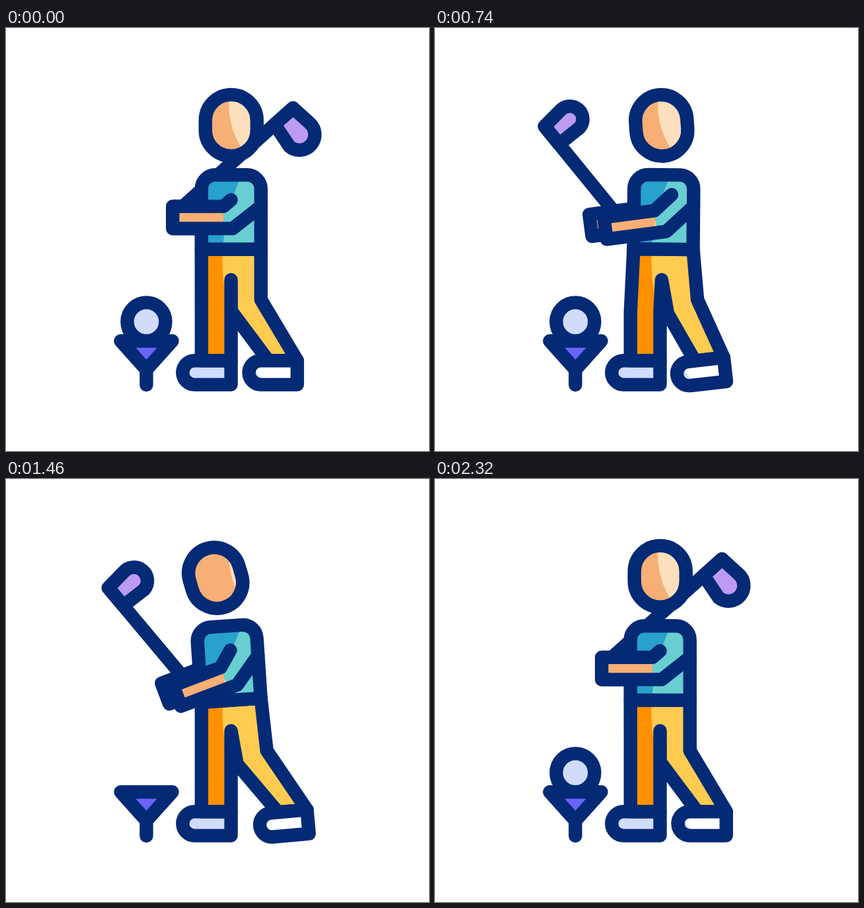
Recreate the animation shown at these times as an HTML page. Size 640x640 px, loop 2400 ms.

```html
<!DOCTYPE html>
<html lang="en">
<head>
<meta charset="utf-8">
<title>Golf swing</title>
<style>
  html, body { margin: 0; width: 100%; height: 100%; overflow: hidden; background: #fff; }
  svg { display: block; width: 100%; height: 100%; }
  .line { fill: none; stroke: #042a75; stroke-width: 20.4; stroke-linecap: round; stroke-linejoin: round; }
</style>
</head>
<body>
<svg id="stage" viewBox="0 0 640 640">
  <defs>
    <clipPath id="lit"><circle cx="627.5" cy="352" r="300"/></clipPath>
    <clipPath id="litFace"><circle cx="461" cy="115" r="124"/></clipPath>
  </defs>
</svg>
<script>
const NS = 'http://www.w3.org/2000/svg';
const stage = document.getElementById('stage');
const LOOP = 2400, STEP = 20;
const SKIN = '#f7af75', SKIN_LIT = '#fcdfbd';
const TEAL = '#28a1cc', TEAL_LIT = '#68ced1';
const SHOE = '#d1dcfb';

function add(parent, tag, attrs) {
  const el = document.createElementNS(NS, tag);
  for (const k in attrs) el.setAttribute(k, attrs[k]);
  return parent.appendChild(el);
}

// A shape with a shaded fill, a lit fill clipped to fixed light, and an outline.
function part({ dark, light, clip = 'lit', line = true }) {
  const paths = [];
  if (dark) paths.push(add(stage, 'path', { fill: dark }));
  if (light) {
    const g = add(stage, 'g', { 'clip-path': `url(#${clip})` });
    paths.push(add(g, 'path', { fill: light }));
  }
  if (line) paths.push(add(stage, 'path', { class: 'line' }));
  return (d, move) => {
    for (const p of paths) {
      p.setAttribute('d', d);
      if (move) p.setAttribute('transform', move);
    }
  };
}

const poly = (pts, close = true) => 'M' + pts.map(p => p.join(' ')).join('L') + (close ? 'Z' : '');
const place = ([x, y], a = 0) => `translate(${x} ${y}) rotate(${a})`;
// Point at local offset (x, y) from p in a frame turned by deg
function from(p, x, y, deg = 0) {
  const r = deg * Math.PI / 180, c = Math.cos(r), s = Math.sin(r);
  return [p[0] + x * c - y * s, p[1] + x * s + y * c];
}

// Parts from back to front
const farArm = part({ dark: SKIN });
const club = part({ dark: '#bd9bf2' });
const shaft = part({});
const frontShoe = part({ dark: SHOE, light: '#fff' });
const pants = part({ dark: '#ff9100', light: '#fdcb50' });
const backShoe = part({ dark: SHOE, light: '#fff' });
const torso = part({ dark: TEAL, light: TEAL_LIT });
const head = part({ dark: SKIN, light: SKIN_LIT, clip: 'litFace' });
const forearm = part({ dark: SKIN, light: SKIN_LIT, line: false });
const sleeve = part({ dark: TEAL_LIT, line: false });
const nearArm = part({});
const tee = part({ dark: '#6a64fa' });
const ball = part({ dark: SHOE });

const HEAD = 'M-39-7.4a39 39 0 0 1 78 0V7.4a39 39 0 0 1-78 0Z';
const TORSO = 'M-45 0V-91.5a21 21 0 0 1 21-21H24a21 21 0 0 1 21 21V0Z';
const SOLE = 'M0 0H-55a18.2 18.2 0 0 0 0 36.4H0Z';
const BALL = 'M-29 0a29 29 0 0 1 58 0a29 29 0 0 1-58 0Z';

frontShoe(SOLE, place([340.5, 503.2]));
tee('M173.4 473.5H251.5L212.4 517ZM212.4 517V540');

// Three key poses; angles in degrees
const REST = {
  hip: 340.7, lean: 0, nod: 0, knee: 385.7, heel: 440.7, tilt: 0,
  armX: 340.5, armY: 260, upper: 139, reach: 15, fore: 0, apart: 0,
  gripX: 262, gripY: 275, swing: -41.8, length: 231
};
const BACK = {
  hip: 352.2, lean: 12.8, nod: 39, knee: 386, heel: 387, tilt: 0,
  armX: 386, armY: 244, upper: 195, reach: 19.5, fore: 45, apart: 0,
  gripX: 321.5, gripY: 197.6, swing: 16, length: 226.5
};
const HIT = {
  hip: 340.7, lean: -8.3, nod: -35, knee: 405, heel: 472.5, tilt: -11,
  armX: 338, armY: 258, upper: 96, reach: 47.3, fore: -45, apart: -38,
  gripX: 275, gripY: 361, swing: -233, length: 129
};

// Moves between poses; bow bends the path of the grip
const MOVES = [
  { a: REST, b: BACK, start: 0, end: 400, bow: [0, 0] },
  { a: BACK, b: HIT, start: 400, end: 1030, bow: [-22, -13] },
  { a: HIT, b: REST, start: 1030, end: 1860, bow: [5, -9] }
];

const portion = (t, start, end) => Math.min(1, Math.max(0, (t - start) / (end - start)));
const half = u => (2 * u) ** 2.2 / 2;
const ease = u => u < 0.5 ? half(u) : 1 - half(1 - u);

function poseAt(t) {
  const { a, b, start, end, bow } = MOVES.findLast(m => t >= m.start);
  const p = ease(portion(t, start, end));
  const pose = {};
  for (const k in a) pose[k] = a[k] + (b[k] - a[k]) * p;
  const bend = 4 * p * (1 - p);
  pose.gripX += bow[0] * bend;
  pose.gripY += bow[1] * bend;
  return pose;
}

function ballAt(t) {
  if (t < 1500) {
    const d = Math.max(0, t - 975) / 85;
    return [212.4 + 203 * d, 444.4 - 43.4 * d];
  }
  const u = portion(t, 1550, 2030);
  return [212.4, -70 + 514.4 * u * u * (3 - 2 * u)];
}

function drawBody(q) {
  const hip = [q.hip, 334.7];
  const neck = from(hip, 0, -135, q.lean);
  head(HEAD, place(from(neck, 0, -52.4, q.nod), q.nod));
  torso(TORSO, place(hip, q.lean));

  const heel = [q.heel, 503.2 - 0.11 * q.tilt ** 2];
  pants(poly([
    from(hip, -45, 0, q.lean), [295.8, 430], [295.8, 503.2], [340.5, 503.2], [340.5, 428],
    [340.5 + (q.hip - 340.7) / 2, 381], [q.knee - 45, 428 + (q.knee - 385.7) * 0.35],
    from(heel, -44, 0, q.tilt), heel, [q.knee, 411], from(hip, 45, 0, q.lean)
  ]));
  backShoe(SOLE, place(heel, q.tilt));
  return from(hip, 45, -65, q.lean);
}

function drawArms(q, side) {
  const shoulder = [q.armX, q.armY];
  const elbow = from(shoulder, q.reach, 0, q.upper);
  const along = (x, y) => from(elbow, x, y, q.fore);
  const top = along(-77, 0), low = along(-77, 33.5);
  const cuff = along(0, 33.5), bend = along(14, 33.5);
  forearm(poly([top, elbow, cuff, low]));
  sleeve(poly([elbow, shoulder, side, bend, cuff]));
  nearArm(poly([shoulder, elbow, top, low, bend, side], false));
  farArm(poly([elbow, top, low, cuff].map(p => from(p, q.apart, q.apart / 5)), false));
}

function drawClub(q) {
  const tip = from([q.gripX, q.gripY], q.length, 0, q.swing);
  const spot = place(tip, q.swing);
  const r = 8.8 + q.length * 0.062;
  const neck = 28 + q.length * 0.04;
  shaft(`M0 0H${-q.length}`, spot);
  club(`M0 0L3.5 33A${r} ${r} 0 0 1 ${3.5 - 2 * r} 40L${-neck} 0Z`, spot);
}

function draw(t) {
  const pose = poseAt(t);
  drawArms(pose, drawBody(pose));
  drawClub(pose);
  ball(BALL, place(ballAt(t)));
}

const start = performance.now();
function tick() {
  const t = Math.round((performance.now() - start) / STEP) * STEP;
  draw(t % LOOP);
  requestAnimationFrame(tick);
}
tick();
</script>
</body>
</html>
```
